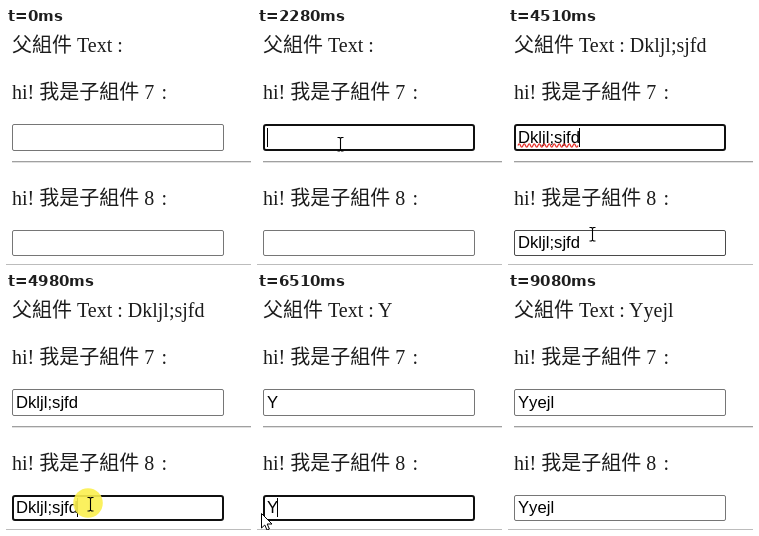
An HTML page that plays this animation: 245 px wide and 237 px high, repeating every 9190 ms.

```html
<!DOCTYPE html>
<html lang="zh-Hant">
<head>
<meta charset="utf-8">
<title>父子組件</title>
<style>
  html, body { margin: 0; width: 100%; height: 100%; overflow: hidden; background: #fff; }
  #stage { position: relative; width: 245px; height: 237px; overflow: hidden; background: #fff; color: #000; }
  #stage > *, .field > * { position: absolute; }
  p {
    margin: 0; left: 6px; white-space: pre; color: #1c1c1c;
    font: 300 20px/22px "Liberation Serif", "Noto Sans CJK TC Light", "Noto Sans CJK TC", "Noto Sans CJK", serif;
  }
  .colon { display: inline-block; width: 20px; text-align: center; }
  .rule { height: 1px; right: 0; }
  .field { left: 0; width: 245px; height: 26.6px; }
  .frame {
    left: 6px; top: 0; width: 212px; height: 100%; box-sizing: border-box;
    border: 1px solid #767676; border-radius: 2px;
  }
  .hover .frame { border-color: #4a4a4a; }
  .focus .frame { border: 2px solid #101010; border-radius: 3px; }
  .value {
    left: 10px; top: 3.5px; white-space: pre;
    font: 16.667px/19px "Liberation Sans", Arial, sans-serif;
  }
  .value b { display: inline-block; font-weight: 400; background: #2c66cb; color: #fff; }
  .value i { position: absolute; left: max(0px, 100% - 1px); top: 0; width: 1px; height: 19px; background: #000; }
  .wave { left: 0; top: 0; fill: none; stroke: #e8322c; stroke-width: 1.3; }
  #mouse { left: 0; top: 0; overflow: visible; }
</style>
</head>
<body>
<div id="stage">
  <p style="top:6px">父組件 Text : <span id="echo"></span></p>
  <p style="top:53px">hi! 我是子組件 7<span class="colon">:</span></p>
  <div class="field" style="top:96.3px"></div>
  <div class="rule" style="left:6px;top:133px;background:#a0a0a0"></div>
  <div class="rule" style="left:6px;top:134px;background:#e0e0e0"></div>
  <p style="top:159px">hi! 我是子組件 8<span class="colon">:</span></p>
  <div class="field" style="top:201.8px"></div>
  <div class="rule" style="left:0;top:236px;background:#bcbcbc"></div>
  <svg id="mouse" width="245" height="237">
    <circle id="press" cx="-2.5" cy="-1" r="14.8" fill="#fbf04e" opacity=".9"/>
    <path id="beam" fill="none" stroke="#000" stroke-width="1.1"
      d="M-3 -6.5 H-1 L0 -5.5 L1 -6.5 H3 M0 -5.5 V6 M-3 7 H-1 L0 6 L1 7 H3"/>
    <path id="arrow" fill="#fff" stroke="#000" stroke-linejoin="round"
      d="M.5 .5 V15 L3.8 12 L6 17 L8.4 16 L6.2 11 H11 Z"/>
  </svg>
</div>
<script>
  const LOOP = 9190;
  const $ = id => document.getElementById(id);
  const within = (t, a, b) => t >= a && t < b;

  const typed = [
    [0, ''], [2410, 'D'], [2810, 'Dk'], [2940, 'Dklj'], [3150, 'Dkljl;'],
    [3220, 'Dkljl;s'], [3350, 'Dkljl;sj'], [3420, 'Dkljl;sjfd'],
    [6050, ''], [6510, 'Y'], [7040, 'Yy'], [7170, 'Yye'], [7300, 'Yyejl']
  ];
  const carets = [
    [0, 0], [1210, 1], [1750, 0], [2280, 1], [3950, 0], [4510, 1],
    [5120, 0], [6050, 1], [7830, 0], [8360, 1], [8890, 0]
  ];
  // first selected letter while dragging leftwards
  const marks = [[0, 99], [5120, 6], [5185, 3], [5250, 0], [6050, 99]];
  // start, end, steps, target x, target y
  const moves = [
    [130, 480, 6, 83.5, 116],
    [4220, 4290, 2, 84.5, 206],
    [4780, 4850, 2, 84.5, 211],
    [5120, 5250, 3, 2, 221],
    [5520, 5521, 1, 4, 220],
    [8310, 8930, 9, 247, 238]
  ];

  const latest = (list, t) => list.filter(e => e[0] <= t).pop()[1];

  function mouseAt(t) {
    let x = 112, y = 186;
    for (const [a, b, n, tx, ty] of moves) {
      if (t < a) break;
      const k = Math.min(n, Math.floor((t - a) / (b - a) * (n - 1) + 1e-6) + 1);
      x += (tx - x) * k / n;
      y += (ty - y) * k / n;
    }
    return [x, y];
  }

  const wave = 'M10 21.5 q1.25 -3.2 2.5 0' + ' t2.5 0'.repeat(23);
  const fields = [...document.querySelectorAll('.field')].map(el => {
    el.innerHTML = `<div class="frame"></div>
      <div class="value"><span></span><b></b><i></i></div>
      <svg class="wave" width="245" height="27"><path d="${wave}"/></svg>`;
    const get = s => el.querySelector(s);
    return { el, plain: get('span'), marked: get('b'), caret: get('i'), wave: get('.wave') };
  });

  const show = (el, on) => { el.style.visibility = on ? 'visible' : 'hidden'; };

  function drawField(f, text, from, s) {
    f.el.className = 'field' + (s.focus ? ' focus' : s.hover ? ' hover' : '');
    f.plain.textContent = text.slice(0, from);
    f.marked.textContent = text.slice(from);
    show(f.caret, s.focus && s.caret);
    show(f.wave, s.wave);
  }

  function draw(t) {
    const text = latest(typed, t), caret = latest(carets, t);
    $('echo').textContent = text;
    drawField(fields[0], text, 99, {
      caret, focus: within(t, 1210, 4850), hover: within(t, 410, 1210), wave: within(t, 4430, 4850)
    });
    drawField(fields[1], text, latest(marks, t), {
      caret, focus: within(t, 4850, 9080), hover: within(t, 4290, 4850), wave: within(t, 5250, 6050)
    });

    const [x, y] = mouseAt(t);
    const beam = within(t, 340, 5520);
    $('mouse').style.transform = `translate(${x}px, ${y}px)`;
    show($('beam'), beam);
    show($('arrow'), !beam && within(t, 130, 8930));
    show($('press'), within(t, 1210, 1340) || within(t, 4850, 5520));
  }

  const begin = performance.now();
  function tick() {
    draw((performance.now() - begin) % LOOP);
    requestAnimationFrame(tick);
  }
  tick();
</script>
</body>
</html>
```
